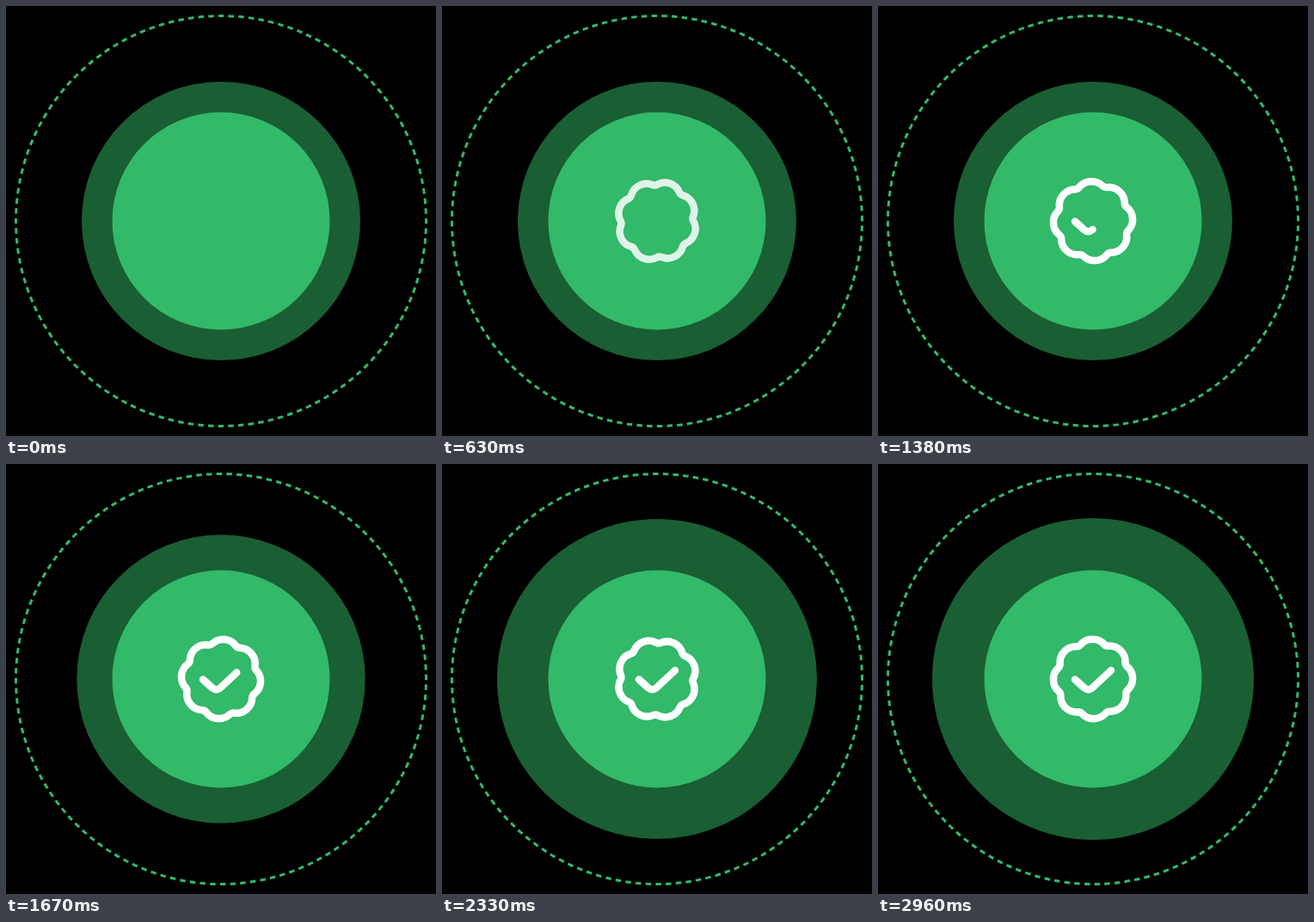
These frames come from a looping animation (500 px wide and 500 px high, 3000 ms). An HTML page:

```html
<!DOCTYPE html>
<html lang="en">
<head>
<meta charset="utf-8">
<title>Verified badge</title>
<style>
  html, body { margin: 0; width: 100%; height: 100%; overflow: hidden; background: #000; }
  svg { display: block; width: 100%; height: 100%; }
  .line { fill: none; stroke: #fff; stroke-width: 8.5; stroke-linecap: round; stroke-linejoin: round; }
</style>
</head>
<body>
<svg viewBox="0 0 500 500">
  <circle id="orbit" cx="250" cy="250" r="238.5" fill="none" stroke="#32b96a" stroke-width="3"
    pathLength="1280" stroke-dasharray="5.6 4.4" stroke-dashoffset="2.8"/>
  <circle id="halo" cx="250" cy="250" r="162" fill="#1a5e33"/>
  <circle cx="250" cy="250" r="126.5" fill="#32b96a"/>
  <path id="badge" class="line"/>
  <path id="check" class="line" pathLength="100" d="M229 250.5 L240 260.5 Q244.5 264 249 260.5 L271 240"/>
</svg>
<script>
  const LOOP = 3000;
  const [orbit, halo, badge, check] =
    ['orbit', 'halo', 'badge', 'check'].map(id => document.getElementById(id));

  const clamp = x => Math.min(1, Math.max(0, x));
  const progress = (t, start, end) => clamp((t - start) / (end - start));
  const easeInOut = x => x * x * (3 - 2 * x);

  // Damped spring whose first peak comes after `half` ms with the given overshoot
  function spring(t, half, overshoot) {
    if (t <= 0) return 0;
    const k = -Math.log(overshoot) / half, w = Math.PI / half;
    return 1 - Math.exp(-k * t) * (Math.cos(w * t) + k / w * Math.sin(w * t));
  }

  // Eight round lobes joined by small concave arcs
  function scallop() {
    const point = deg => {
      const a = deg * Math.PI / 180;
      return `${250 + 42.3 * Math.cos(a)} ${250 + 42.3 * Math.sin(a)}`;
    };
    let d = 'M' + point(-19);
    for (let a = 0; a < 360; a += 45) {
      d += `A18.5 18.5 0 0 1 ${point(a + 19)}A6 6 0 0 0 ${point(a + 26)}`;
    }
    return d + 'Z';
  }

  function draw(now) {
    const t = now % LOOP;
    const turn = `rotate(${90 * t / LOOP} 250 250)`;
    orbit.setAttribute('transform', turn);
    badge.setAttribute('transform', turn);
    badge.setAttribute('opacity', progress(t, 0, 750));
    halo.setAttribute('r', 162 + 25 * spring(t - 1590, 370, 0.2));

    const drawn = 100 * easeInOut(progress(t, 1000, 1800));
    check.setAttribute('visibility', drawn > 0 ? 'visible' : 'hidden');
    check.setAttribute('stroke-dasharray', `${drawn} 200`);
    requestAnimationFrame(draw);
  }

  badge.setAttribute('d', scallop());
  draw(0);
</script>
</body>
</html>
```
